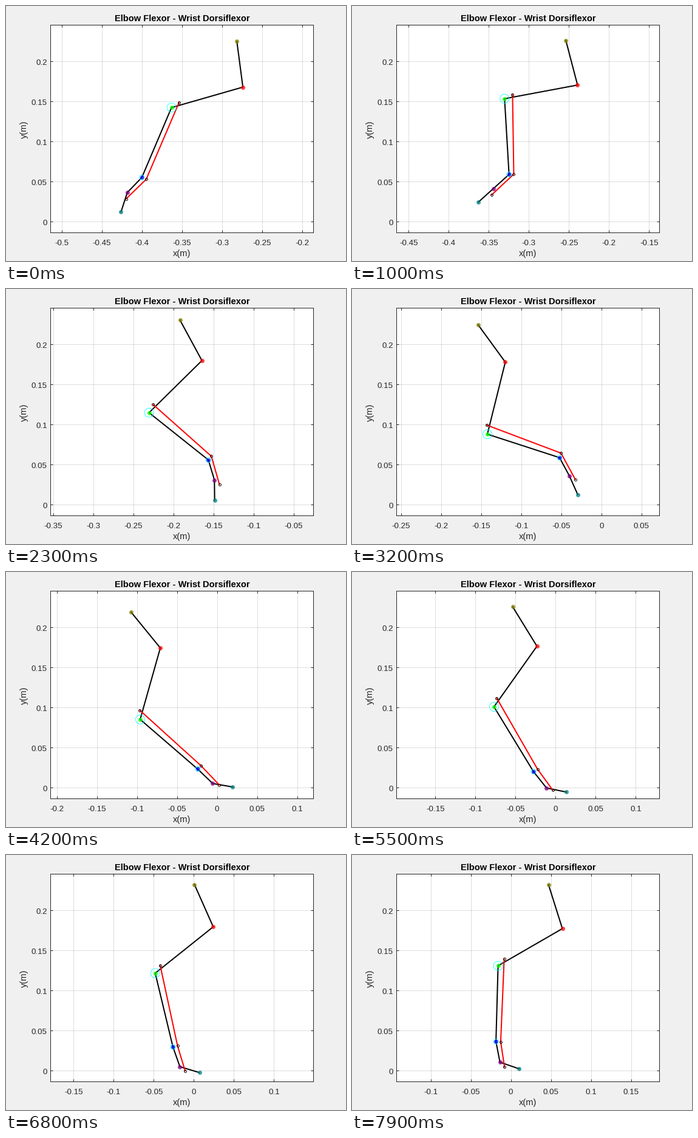
A matplotlib script that plays this animation: 560x420 px, repeating every 8 s.

```python
import numpy as np
import matplotlib.pyplot as plt
from matplotlib.animation import FuncAnimation
from matplotlib.patches import Circle
from matplotlib.ticker import FuncFormatter, MultipleLocator
from matplotlib.transforms import Affine2D

W, H, DPI = 560, 420, 100
PT = 72 / DPI                 # points per pixel
SCALE = 1320                  # pixels per metre
LEFT, RIGHT, TOP, BOTTOM = 73.3, 506.3, 31.3, 373.3
GROUND = 355.3                # pixel row of y = 0
HOLD, STEPS = 4, 80
INK = "#262626"

SCAPULA, UPPER, FOREARM, HAND, FINGERS = 76, 122.3, 125, 34.5, 33.5
ELBOW_R, WRIST_R = 7.5, 3.9

plt.rcParams["font.family"] = "Liberation Sans"


def smooth(u):
    return u * u * (3 - 2 * u)


def ease_out(u):
    return 1 - (1 - u) ** 1.35


def linear(u):
    return u


def glide(n, value, *legs):
    """Value at step n, moving from `value` through (end step, end value, ease)."""
    begin = 0
    for end, goal, ease in legs:
        if n <= end:
            return value + (goal - value) * ease((n - begin) / (end - begin))
        begin, value = end, goal
    return value


def ray(length, deg):
    a = np.radians(deg)
    return length * np.array([np.cos(a), -np.sin(a)])


def skeleton(n):
    """Joint and muscle points in metres; angles run clockwise from +x."""
    shoulder = np.array([
        glide(n, -361.5, (19, -217, linear), (38, -93.5, linear), (75, 85, linear)),
        glide(n, 221.7, (20, 237.5, smooth), (40, 230, smooth),
              (64, 237, smooth), (75, 234, smooth))])
    scap = glide(n, -97.5, (36, -130.4, ease_out), (75, -107.5, linear))
    upper = glide(n, 164, (6, 169.4, smooth), (33, 97.5, smooth), (75, 150, ease_out))
    fore = glide(n, 113, (28, 18, ease_out), (38, 40.8, smooth), (75, 91.6, linear))
    hand = glide(n, 134, (6, 138, smooth), (21, 70, smooth),
                 (40, 43, smooth), (75, 79, smooth))
    fingers = glide(n, 108, (6, 138, smooth), (24, 78, smooth),
                    (39, 9, smooth), (75, 19, smooth))

    elbow = shoulder + ray(UPPER, upper)
    wrist = elbow + ray(FOREARM, fore)
    knuckle = wrist + ray(HAND, hand)
    tip = knuckle + ray(FINGERS, fingers)
    joints = [shoulder + ray(SCAPULA, scap), shoulder, elbow, wrist, knuckle, tip]
    muscle = [elbow + ray(2 * ELBOW_R, upper + 180 - 18),
              wrist + ray(2 * WRIST_R, fore - 90),
              knuckle + ray(11, hand - 32)]
    return np.array(joints) / SCALE, np.array(muscle) / SCALE


fig = plt.figure(figsize=(W / DPI, H / DPI), dpi=DPI, facecolor="#f0f0f0")
ax = fig.add_axes([LEFT / W, 1 - BOTTOM / H, (RIGHT - LEFT) / W, (BOTTOM - TOP) / H])
ax.set_ylim((GROUND - BOTTOM) / SCALE, (GROUND - TOP) / SCALE)

ax.set_axisbelow(True)
ax.grid(color=INK, alpha=0.15, linewidth=PT)
ax.tick_params(direction="in", top=True, right=True, length=4.3 * PT, width=PT,
               color=INK, labelcolor=INK, labelsize=13.33 * PT)
ax.tick_params(axis="x", pad=11.3 * PT)
ax.tick_params(axis="y", pad=5.5 * PT)
for spine in ax.spines.values():
    spine.set(color=INK, linewidth=PT)
for axis in (ax.xaxis, ax.yaxis):
    axis.set_major_locator(MultipleLocator(0.05))
    axis.set_major_formatter(FuncFormatter(lambda v, _: f"{round(v, 2) + 0:g}"))
for text in ax.get_yticklabels():
    text.set_transform(text.get_transform() + Affine2D().translate(0, -1.5))


def label(x, y, text, **style):
    fig.text(x / W, 1 - y / H, text, ha="center", va="baseline",
             fontsize=14.67 * PT, rotation_mode="anchor", **style)


label(290, 25, "Elbow Flexor - Wrist Dorsiflexor", weight="bold", color="black")
label(290, 412, "x(m)", color=INK)
label(33.5, 203, "y(m)", color=INK, rotation=90)

DOT_COLORS = ["#808000", "#ff0000", "#00ff00", "#0000ff", "#800080", "#008080"]
bones, = ax.plot([], [], color="black", linewidth=2 * PT, zorder=3)
dots = [ax.plot([], [], "o", color=c, alpha=0.75, markersize=7 * PT,
                markeredgewidth=0, zorder=4)[0] for c in DOT_COLORS]
tendon, = ax.plot([], [], color="red", linewidth=2 * PT, zorder=5)
pins, = ax.plot([], [], "o", markersize=4 * PT, markerfacecolor="none",
                markeredgecolor="black", markeredgewidth=0.9 * PT, zorder=6)
rings = [ax.add_patch(Circle((0, 0), r / SCALE, fill=False, edgecolor="cyan",
                             linewidth=0.8 * PT, zorder=6))
         for r in (ELBOW_R, WRIST_R)]


def draw(i):
    joints, muscle = skeleton(max(0, i - HOLD))
    for dot, (x, y) in zip(dots, joints):
        dot.set_data([x], [y])
    bones.set_data(*joints.T)
    tendon.set_data(*muscle.T)
    pins.set_data(*muscle.T)

    xs = [*joints[:, 0], *muscle[:, 0]]
    for ring, centre in zip(rings, joints[2:4]):
        ring.center = tuple(centre)
        xs += [centre[0] - ring.radius, centre[0] + ring.radius]

    # The view stays centred on everything drawn.
    mid = (min(xs) + max(xs)) / 2
    half = (RIGHT - LEFT) / 2 / SCALE
    ax.set_xlim(mid - half, mid + half)
    return [bones, *dots, tendon, pins, *rings]


anim = FuncAnimation(fig, draw, frames=STEPS, interval=100, repeat=True,
                     repeat_delay=0, blit=False)
plt.show()
```
